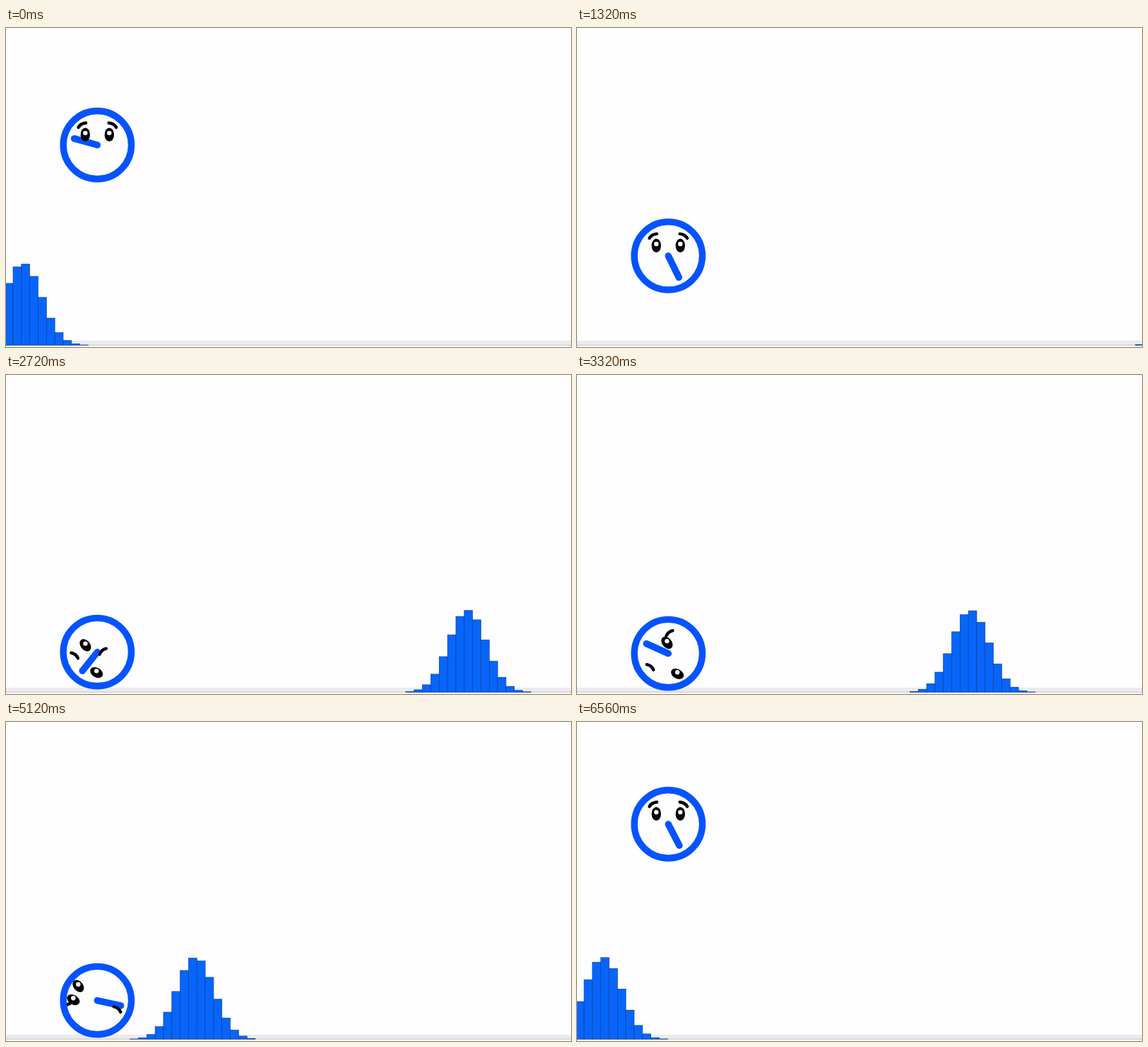
These frames come from a looping animation (800x452 px, 6600 ms). An HTML page:

```html
<!DOCTYPE html>
<html lang="en">
<head>
<meta charset="utf-8">
<title>Clock and bell curve</title>
<style>
  html, body { margin: 0; width: 100%; height: 100%; overflow: hidden; background: #fefdff; }
  svg { display: block; width: 800px; height: 452px; }
</style>
</head>
<body>
<svg viewBox="0 0 800 452">
  <rect width="800" height="452" fill="#fefdff"/>
  <rect y="443" width="800" height="6" fill="#ebebed"/>
  <rect y="448.8" width="800" height="1.2" fill="#cbcbcf"/>
  <g id="bars" fill="#0765fb" stroke="#0a3987" stroke-width=".6"></g>
  <g id="clock">
    <circle r="46" fill="#fefdff"/>
    <line id="hand" y2="-34" stroke="#0553fe" stroke-width="9.5" stroke-linecap="round"/>
    <g id="face"></g>
    <circle r="48.2" fill="none" stroke="#0553fe" stroke-width="9.4"/>
  </g>
</svg>
<script>
const LOOP = 6600;
const BASE = 449.6, PITCH = 11.83, SIGMA = 26.45, PEAK = 116.3;
const SPEED = 0.1605, FIRST_MEAN = 24.1, PASS_GAP = 1066;
const REST_Y = 394.6, DROP = 229, DROP_TIME = 3000;
const APEX_Y = 77, APEX_TIME = 6151, GRAVITY = 4.03e-4;

const byId = id => document.getElementById(id);
const clamp = (v, lo, hi) => Math.min(hi, Math.max(lo, v));
const ramp = (t, from, to) => clamp((t - from) / (to - from), 0, 1);
const hump = (t, from, to) => Math.sin(Math.PI * ramp(t, from, to)) ** 2;
const mix = (a, b, k) => a + (b - a) * k;

function add(parent, tag, attrs = {}) {
  const node = document.createElementNS('http://www.w3.org/2000/svg', tag);
  for (const key in attrs) node.setAttribute(key, attrs[key]);
  return parent.appendChild(node);
}

// Sinks with an ease-out, rests, then hops over the passing bars.
function clockY(t) {
  const sink = REST_Y - DROP * (1 - ramp(t, 0, DROP_TIME)) ** 2;
  const hop = APEX_Y + GRAVITY * (t - APEX_TIME) ** 2;
  return Math.min(sink, hop);
}

// Steady spin with a slow sway and a surge while the clock settles.
function handAngle(t) {
  const sway = 28 * Math.sin(2 * Math.PI * t / LOOP);
  return 284 + 1.5165 * t + sway + 133 * hump(t, 1320, 3560);
}

function drawEye(g) {
  const body = add(g, 'ellipse', { rx: 6.7, ry: 9.7 });
  add(g, 'circle', { cy: -2.3, r: 3.2, fill: '#fefdff' });
  return body;
}

function drawBrow(g, side) {
  return add(g, 'path', {
    d: `M${5.5 * side} 3.2Q${2 * side} -2.6 ${-5 * side} -3`,
    fill: 'none', stroke: '#000', 'stroke-width': 4.4, 'stroke-linecap': 'round'
  });
}

const EYE = { draw: drawEye, x: 17, y: -14.6, rock: 12 };
const BROW = { draw: drawBrow, x: 21.3, y: -28.2, rock: 0 };

// While loose, each feature tumbles through three stops inside the dial.
const features = [
  { ...EYE, side: -1, lean: -40, stops: [[-34, -4], [-1, -15], [-27, -20.5]] },
  { ...EYE, side: 1, lean: -60, stops: [[-18, 28], [14.5, 30], [-34, -1]] },
  { ...BROW, side: -1, lean: -10, stops: [[13, 30], [3.5, -30], [-43, 8]] },
  { ...BROW, side: 1, lean: 8, stops: [[-37, -11], [-28, 19.5], [28, 12.5]] }
];
for (const f of features) {
  f.group = add(byId('face'), 'g');
  f.body = f.draw(f.group, f.side);
}

function placeFeature(f, t) {
  const loose = ramp(t, 1360, 2120) - ramp(t, 5260, 5600);
  const along = 2 * ramp(t, 2120, 4440);
  const i = Math.min(1, Math.floor(along));
  const [x, y] = [f.side * f.x, f.y].map((home, axis) =>
    mix(home, mix(f.stops[i][axis], f.stops[i + 1][axis], along - i), loose));
  const turn = f.lean * loose + f.rock * hump(t, 5540, 5840);
  f.group.setAttribute('transform', `translate(${x} ${y})`);
  f.body.setAttribute('transform', `rotate(${turn})`);
}

const bars = Array.from({ length: 68 }, (_, n) => {
  const x = 10 + (n - 1) * PITCH;
  return { x, node: add(byId('bars'), 'rect', { x, width: PITCH }) };
});

// The curve slides left across a fixed grid; the next pass follows behind.
function updateBars(t) {
  const mean = FIRST_MEAN - SPEED * t;
  for (const { x, node } of bars) {
    const bell = m => PEAK * Math.exp(-0.5 * ((x + PITCH / 2 - m) / SIGMA) ** 2);
    const height = Math.max(bell(mean), bell(mean + PASS_GAP));
    node.setAttribute('y', BASE - height);
    node.setAttribute('height', height);
    node.setAttribute('visibility', height > 0.4 ? 'visible' : 'hidden');
  }
}

function render(t) {
  updateBars(t);
  byId('clock').setAttribute('transform', `translate(129.3 ${clockY(t)})`);
  byId('hand').setAttribute('transform', `rotate(${handAngle(t)})`);
  for (const f of features) placeFeature(f, t);
}

const start = performance.now();
function tick() {
  render((performance.now() - start) % LOOP);
  requestAnimationFrame(tick);
}
tick();
</script>
</body>
</html>
```
